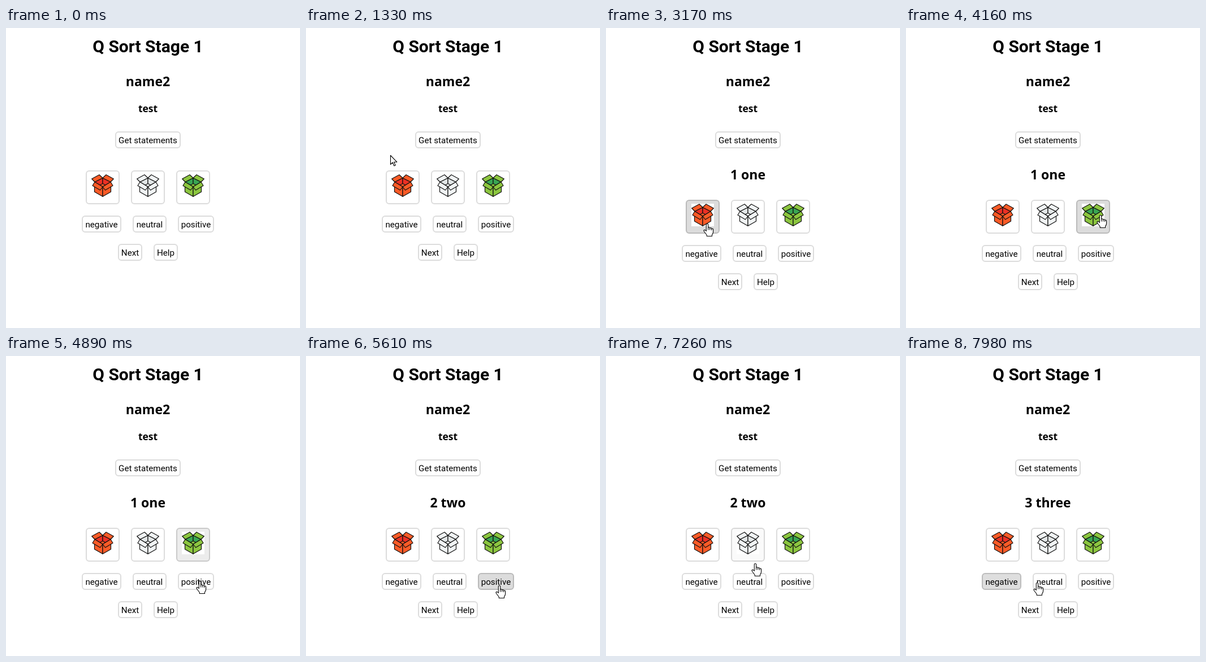
Recreate the animation shown at these times as an HTML page with a canvas. Size 520 by 531 pixels, loop 8 s.

```html
<!DOCTYPE html>
<html lang="en">
<head>
<meta charset="utf-8">
<title>Sorting stage</title>
<style>
html, body { margin: 0; width: 100%; height: 100%; overflow: hidden; background: #fff; }
canvas { display: block; }
</style>
</head>
<body>
<canvas id="stage" width="520" height="531"></canvas>
<script>
const ctx = document.getElementById('stage').getContext('2d');
const LOOP = 8000, STEP = 65.9, LAG = 70, FADE = 150;
const MID = 251, GAP = 20, SHIFT_AT = 1790, SHIFT = 52;
const UI = 'Roboto, sans-serif', HEAD = '"Open Sans", "Noto Sans", sans-serif';

// Pointer moves: begin, end, place reached and, for a curve, its two handles
const start = { x: 239, y: 494 };
const moves = [
  { from: 930, to: 1660, x: 226, y: 197, bend: [{ x: 60, y: 430 }, { x: 70, y: 204 }] },
  { from: 2710, to: 3170, x: 179, y: 346 },
  { from: 3440, to: 3630, x: 248, y: 343 },
  { from: 3770, to: 4160, x: 344, y: 331 },
  { from: 4620, to: 5150, x: 343, y: 410 },
  { from: 5420, to: 5610, x: 342, y: 406 },
  { from: 5940, to: 6400, x: 278, y: 405 },
  { from: 6730, to: 6990, x: 258, y: 262 },
  { from: 7150, to: 7260, x: 264, y: 367 },
  { from: 7260, to: 7520, x: 155, y: 402 },
  { from: 7870, to: 7980, x: 232, y: 401 }
];

const statements = [[SHIFT_AT, '1 one'], [5420, '2 two'], [7590, '3 three']];

// Outer and inner colours of each open box
const red = ['#fc5b27', '#ed3024'];
const grey = ['#f1f4f5', '#e3e7e8'];
const green = ['#8cc63f', '#39a552'];

// A centred row of buttons, each item being [width, label or colours]
function row(y, h, ...items) {
  const total = items.reduce((sum, [w]) => sum + w + GAP, -GAP);
  let x = MID - total / 2;
  return items.map(([w, face]) => {
    const b = { x, y, w, h, face };
    x += w + GAP;
    return b;
  });
}

const buttons = [
  ...row(183, 30, [116, 'Get statements']),
  ...row(252, 60, [60, red], [60, grey], [60, green]),
  ...row(332, 30, [70, 'negative'], [60, 'neutral'], [64, 'positive']),
  ...row(382, 30, [43, 'Next'], [43, 'Help'])
];

const mix = (a, b, k) => a + (b - a) * k;
const easeOut = k => 1 - (1 - k) ** 2;
const shade = v => `rgb(${v},${v},${v})`;
const topOf = (b, t) => b.y + (b !== buttons[0] && t >= SHIFT_AT ? SHIFT : 0);

function bezier(a, b, c, d, k) {
  const j = 1 - k;
  const at = n => j ** 3 * a[n] + 3 * j * j * k * b[n] + 3 * j * k * k * c[n] + k ** 3 * d[n];
  return { x: at('x'), y: at('y') };
}

function pointer(t) {
  if (t < moves[0].from) return null;
  let p = start;
  for (const m of moves) {
    if (t < m.from) break;
    const k = easeOut(Math.min(1, (t - m.from) / (m.to - m.from)));
    const [b, c] = m.bend || [p, m];
    p = bezier(p, b, c, m, k);
  }
  return p;
}

function over(b, t) {
  const p = pointer(t);
  if (!p) return false;
  const y = topOf(b, t);
  return p.x >= b.x && p.x < b.x + b.w && p.y >= y && p.y < y + b.h;
}

// Hover strength is the share of the recent past spent over the button
function hover(b, t) {
  const n = 15;
  let hits = 0;
  for (let i = 0; i < n; i++) hits += over(b, t - LAG - i * FADE / n);
  return hits / n;
}

function text(str, x, y, font) {
  ctx.font = font;
  ctx.fillStyle = '#000';
  ctx.fillText(str, x, y);
}

function poly(pts, fill) {
  ctx.beginPath();
  for (let i = 0; i < pts.length; i += 2) ctx.lineTo(pts[i], pts[i + 1]);
  ctx.closePath();
  ctx.fillStyle = fill;
  ctx.fill();
  ctx.stroke();
}

function mirrored(pts, fill) {
  poly(pts, fill);
  poly(pts.map((v, i) => i % 2 ? v : 40 - v), fill);
}

function openBox(x, y, [outer, inner]) {
  ctx.save();
  ctx.translate(x, y);
  ctx.fillStyle = '#fff';
  ctx.fillRect(0, 0, 40, 40);
  ctx.strokeStyle = '#111';
  ctx.lineWidth = 1.2;
  ctx.lineJoin = 'round';
  mirrored([6, 13.5, 20, 6.5, 20, 22], inner);
  poly([20, 16.5, 25, 19, 20, 22, 15, 19], outer);
  mirrored([5.5, 20, 20, 22, 20, 39.3, 5.5, 31], outer);
  mirrored([0.7, 8, 14, 0.8, 20, 6.5, 6, 13.5], outer);
  mirrored([6, 13.5, 20, 22, 15.5, 28, 2, 20], outer);
  ctx.restore();
}

function button(b, t) {
  const y = topOf(b, t), k = hover(b, t);
  ctx.beginPath();
  ctx.roundRect(b.x + 1, y + 1, b.w - 2, b.h - 2, 5);
  ctx.fillStyle = shade(mix(255, 220, k));
  ctx.fill();
  ctx.strokeStyle = shade(mix(220, 186, k));
  ctx.lineWidth = 2;
  ctx.stroke();
  if (Array.isArray(b.face)) openBox(b.x + 10, y + 7, b.face);
  else text(b.face, b.x + b.w / 2, y + 21, '15.2px ' + UI);
}

const hand = new Path2D('M-1.7 13.5V1.8Q-1.7.5 0 .5T1.7 1.8V7Q4.4 6.3 4.7 8' +
  'Q7.3 7.2 7.7 9Q10.6 8.6 10.6 11V15Q10.6 17.5 8.5 20V22.5H-.7V20.5' +
  'L-5.2 14.5Q-6.6 12.3-5.4 11.5T-1.7 13.5Z');
const knuckles = new Path2D('M1.7 7V11.5M4.7 8V11.5M7.7 9V12');
const arrow = new Path2D('M.5.5V16.5L4.2 13L6.8 19L9.2 18L6.6 12.2H11.8Z');

function drawPointer(t) {
  const p = pointer(t);
  if (!p) return;
  const onButton = buttons.some(b => over(b, t) || over(b, t - LAG));
  const shape = onButton ? hand : arrow;
  ctx.save();
  ctx.translate(Math.round(p.x), Math.round(p.y));
  ctx.fillStyle = '#fff';
  ctx.strokeStyle = '#000';
  ctx.lineWidth = 1.1;
  ctx.lineJoin = 'round';
  ctx.fill(shape);
  ctx.stroke(shape);
  if (onButton) ctx.stroke(knuckles);
  ctx.restore();
}

function draw(t) {
  ctx.fillStyle = '#fff';
  ctx.fillRect(0, 0, 520, 531);
  ctx.textAlign = 'center';
  text('Q Sort Stage 1', MID, 43, 'bold 30px ' + UI);
  text('name2', MID, 103, 'bold 23px ' + HEAD);
  text('test', MID, 149, 'bold 17.5px ' + HEAD);
  const shown = statements.filter(([at]) => t >= at).pop();
  if (shown) text(shown[1], MID, 268, 'bold 23px ' + HEAD);
  buttons.forEach(b => button(b, t));
  drawPointer(t);
}

// The picture advances in even steps
const stepped = t => Math.max(0, Math.floor((t - 4) / STEP)) * STEP + 12;

function tick() {
  draw(stepped(performance.now() % LOOP));
  requestAnimationFrame(tick);
}
tick();
</script>
</body>
</html>
```
